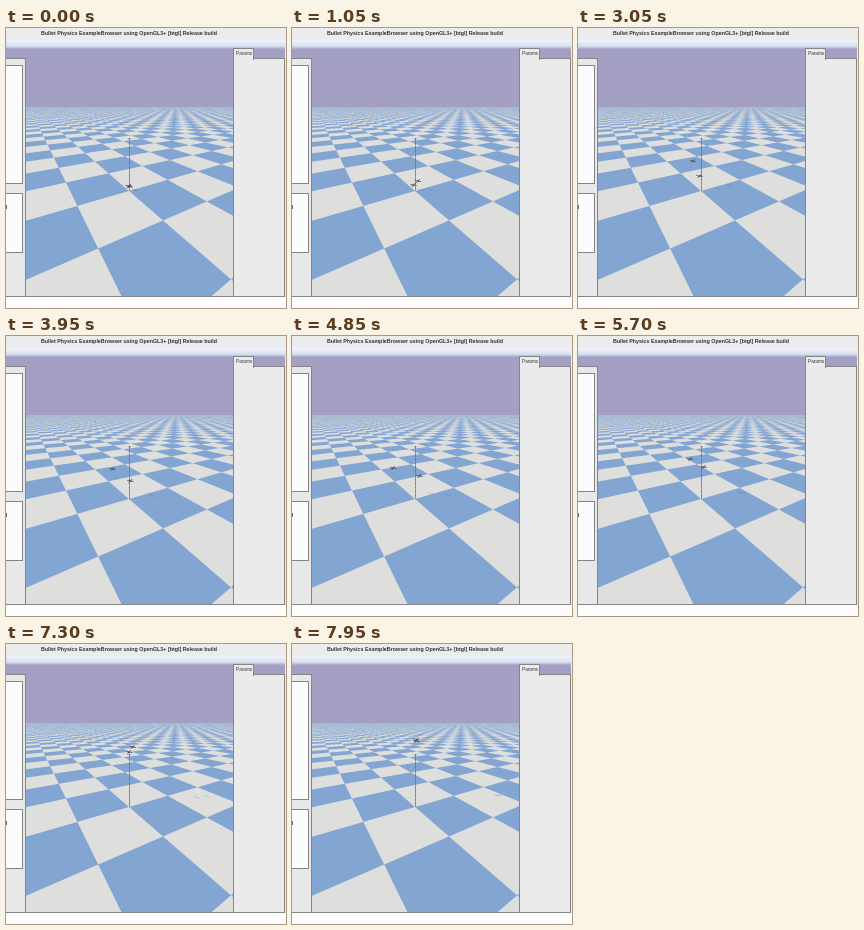
Write an HTML page with a canvas that moves like this. It is 280 px wide and 280 px high and loops after 8000 ms.

```html
<!DOCTYPE html>
<html lang="en">
<head>
<meta charset="utf-8">
<style>
html, body { margin: 0; width: 100%; height: 100%; overflow: hidden; background: #ececec; }
canvas { display: block; width: 280px; height: 280px; }
</style>
</head>
<body>
<canvas id="stage" width="280" height="280"></canvas>
<script>
const SIZE = 280, LOOP = 8000;
const VIEW = { left: 19, top: 20, right: 228, bottom: 268, horizon: 79 };
const CAMERA = { x: 123, y: 163, focal: 153, distance: 3 };
const SIN = 0.5, COS = Math.sqrt(3) / 2;   // pitch and yaw are both 30 degrees
const BLUE = [131, 165, 210], WHITE = [222, 223, 221], HAZE = [168, 186, 209];
const FONT = '"Liberation Sans", Arial, sans-serif';

const ctx = document.getElementById('stage').getContext('2d');
const backdrop = document.createElement('canvas');
backdrop.width = backdrop.height = SIZE;

// Is the floor tile seen through this screen point white?
function isWhite(px, py) {
  const slope = (CAMERA.y - py) / CAMERA.focal;
  const ahead = slope * CAMERA.distance / (SIN - slope * COS);
  const side = (px - CAMERA.x) / CAMERA.focal * (CAMERA.distance + ahead * COS);
  const i = Math.floor(side * SIN - ahead * COS);
  const j = Math.floor(-side * COS - ahead * SIN);
  return (i + j) % 2 === 0;
}

function drawFloor(g) {
  const w = VIEW.right - VIEW.left, h = VIEW.bottom - VIEW.horizon, n = 5;
  const image = g.createImageData(w, h);
  for (let y = 0; y < h; y++) for (let x = 0; x < w; x++) {
    let white = 0;
    for (let k = 0; k < n * n; k++) {
      const px = VIEW.left + x + (k % n + 0.5) / n;
      const py = VIEW.horizon + y + (Math.floor(k / n) + 0.5) / n;
      if (isWhite(px, py)) white++;
    }
    const mix = white / (n * n), haze = Math.exp(-y / 6), at = (y * w + x) * 4;
    for (let c = 0; c < 3; c++) {
      const tile = BLUE[c] + (WHITE[c] - BLUE[c]) * mix;
      image.data[at + c] = tile + (HAZE[c] - tile) * haze;
    }
    image.data[at + 3] = 255;
  }
  g.putImageData(image, VIEW.left, VIEW.horizon);
}

function drawBackdrop(g) {
  const box = (color, x, y, w, h) => { g.fillStyle = color; g.fillRect(x, y, w, h); };
  const label = (text, x, y, font) => {
    g.fillStyle = '#333';
    g.font = `${font} ${FONT}`;
    g.fillText(text, x, y);
  };
  const frame = (fill, x, y, w, h) => {
    box(fill, x, y, w, h);
    g.strokeStyle = '#858585';
    g.strokeRect(x + 0.5, y + 0.5, w - 1, h - 1);
  };

  box('#ececec', 0, 0, SIZE, SIZE);
  const band = g.createLinearGradient(0, 12, 0, 21);
  band.addColorStop(0, '#f1f4fa');
  band.addColorStop(0.7, '#d5def0');
  band.addColorStop(1, '#a8a4c8');
  box(band, 0, 12, 279, 9);
  box('#a3a0c4', 0, 21, 279, 58);
  drawFloor(g);

  frame('#e8e8e8', -1, 30, 21, 239);
  frame('#fcfcfc', -1, 37, 18, 119);
  frame('#fcfcfc', -1, 165, 18, 60);
  box('#444', 0, 177, 0.8, 4);

  frame('#ebebeb', 227, 30, 52, 239);
  frame('#ebebeb', 227, 20, 21, 12);
  box('#ebebeb', 228, 30, 19, 3);
  box('#858585', 0, 268, 279, 1);
  box('#fdfdfd', 0, 269, SIZE, 11);

  label('Bullet Physics ExampleBrowser using OpenGL3+ [btgl] Release build', 35, 7.2, 'bold 5.33px');
  label('Params', 230, 26.8, '4.7px');
}

// Each path point: time in ms, x, y.
const drones = [
  [[0, 123, 158], [1050, 126, 153], [1850, 109.5, 145], [3050, 115, 133],
   [4850, 101, 132], [6600, 126, 111], [8000, 124.5, 95]],
  [[0, 123.5, 158.5], [1050, 121.5, 157], [1850, 127.5, 152.5], [3050, 121.5, 148],
   [4850, 127.5, 140], [6600, 123, 119], [8000, 124, 96.5]]
];

// Cubic Hermite interpolation along a path.
function positionAt(path, time) {
  let i = 0;
  while (i < path.length - 2 && time >= path[i + 1][0]) i++;
  const p = path[i], q = path[i + 1], span = q[0] - p[0], u = (time - p[0]) / span;
  const tangent = (k, c) => {
    const a = path[Math.max(k - 1, 0)], b = path[Math.min(k + 1, path.length - 1)];
    return (b[c] - a[c]) / (b[0] - a[0]) * span;
  };
  return [1, 2].map(c =>
    p[c] + (q[c] - p[c]) * u * u * (3 - 2 * u)
    + tangent(i, c) * u * (1 - u) ** 2 - tangent(i + 1, c) * u * u * (1 - u));
}

function line(color, width, ...points) {
  ctx.strokeStyle = color;
  ctx.lineWidth = width;
  ctx.beginPath();
  points.forEach(([x, y]) => ctx.lineTo(x, y));
  ctx.stroke();
}

function drawDrone(x, y) {
  line('#5b6270', 0.6, [x - 3, y - 0.6], [x + 3, y + 0.6]);
  line('#5b6270', 0.6, [x - 1.6, y + 1.3], [x + 1.6, y - 1.3]);
  ctx.fillStyle = '#40444e';
  ctx.fillRect(x - 1, y - 0.6, 2, 1.3);
  for (const [dx, dy] of [[-2.5, -0.6], [2.5, 0.6], [-1.4, 1.2], [1.4, -1.2]])
    ctx.fillRect(x + dx - 0.6, y + dy - 0.3, 1.2, 0.6);
}

function drawShadow(x, y) {
  const height = (CAMERA.y - y) / 57;
  const sx = x + height * 70, sy = CAMERA.y - height * 10;
  line('rgba(70,80,100,0.25)', 0.8, [sx - 3, sy - 0.8], [sx + 3, sy + 0.8]);
}

function drawAxis() {
  line('#7c8494', 0.7, [123.5, 110.5], [123.5, 163]);
  ctx.setLineDash([2, 2]);
  line('#5b6270', 0.6, [123.5, 110.5], [123.5, 163]);
  ctx.setLineDash([]);
  line('#5b6270', 0.7, [122.4, 110.7], [124.6, 110.7]);
}

function render(now) {
  const time = now % LOOP;
  const places = drones.map(path => positionAt(path, time));
  ctx.drawImage(backdrop, 0, 0);
  places.forEach(place => drawShadow(...place));
  drawAxis();
  places.forEach(place => drawDrone(...place));
  requestAnimationFrame(render);
}

drawBackdrop(backdrop.getContext('2d'));
requestAnimationFrame(render);
</script>
</body>
</html>
```
